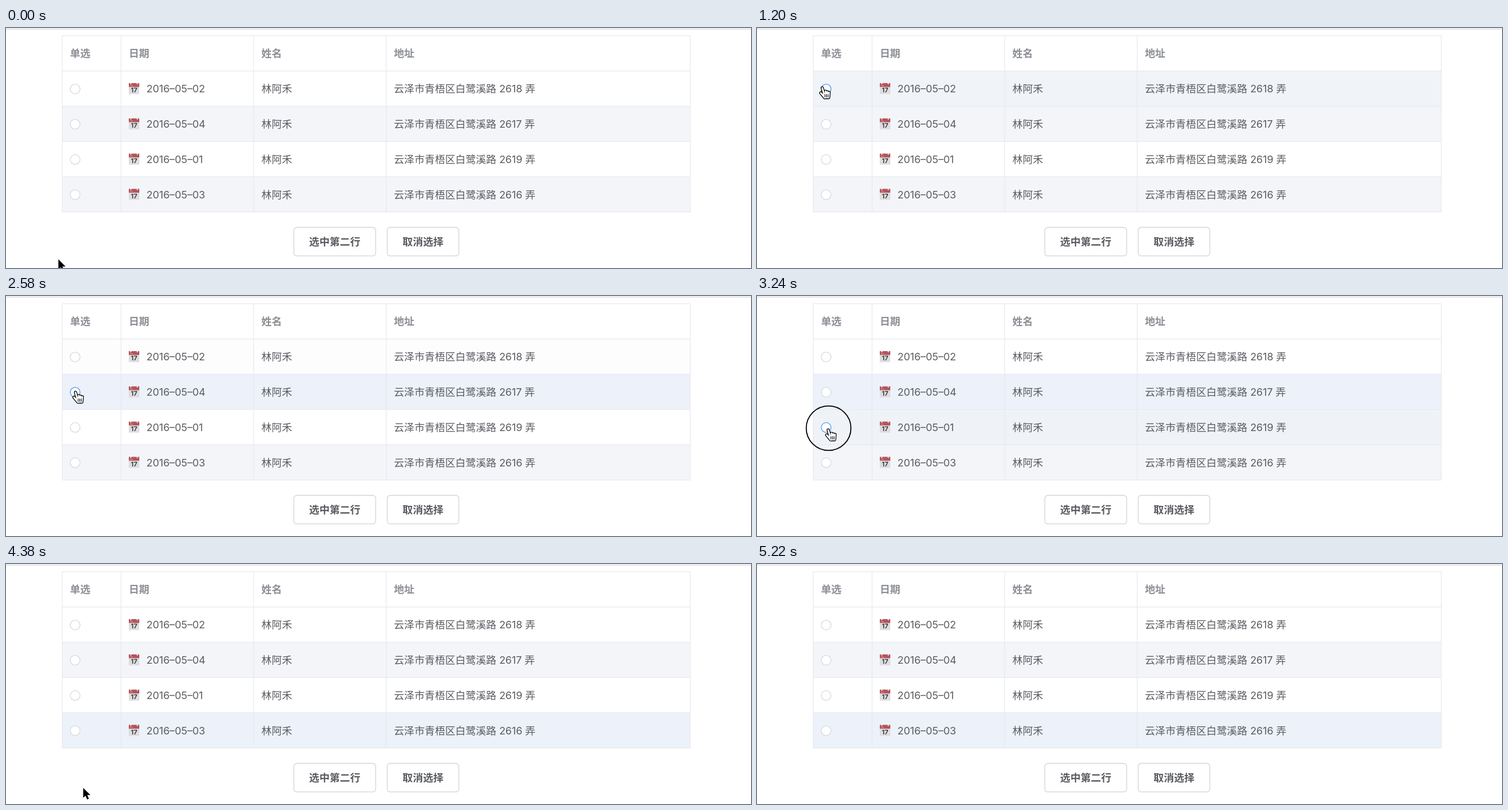
Recreate the animation shown at these times as an HTML page with a canvas. Size 1280 by 414 pixels, loop 5280 ms.

```html
<!DOCTYPE html>
<html lang="zh-CN">
<head>
<meta charset="utf-8">
<title>单选表格</title>
<style>
html, body { margin: 0; width: 100%; height: 100%; overflow: hidden; background: #fff; }
canvas { display: block; }
</style>
</head>
<body>
<canvas id="stage" width="1280" height="414"></canvas>
<script>
const ctx = document.getElementById('stage').getContext('2d');
const LOOP = 5280, STEP = 60;
const TOP = 13.4, ROW_H = 60.8, LEFT = 96.6, RIGHT = 1175.6;
const COLS = [LEFT, 197.7, 425.5, 653.2];
const PAD = 13.3, BASELINE = ROW_H / 2 + 6.5;
const FONT = '17.6px Inter, "Noto Sans CJK SC", "Noto Sans CJK", sans-serif';

const HEAD = ['单选', '日期', '姓名', '地址'];
const PERSON = '林阿禾', STREET = '云泽市青梧区白鹭溪路';
const ROWS = [[2, 8], [4, 7], [1, 9], [3, 6]].map(([day, no]) =>
  ({ date: `2016–05–0${day}`, address: `${STREET} 261${no} 弄` }));

const WHITE = [255, 255, 255], STRIPE = [243, 245, 249];
const HOVER = [239, 242, 247], PICKED = [236, 241, 250];
const LINE = '#e7e9ee', INK = '#595b60';

// Pointer moves: start, end, target
const MOVES = [
  { from: 300, to: 420, x: 174, y: 346 },
  { from: 540, to: 1080, x: 112, y: 100 },
  { from: 1140, to: 1380, x: 117, y: 101 },
  { from: 1740, to: 2040, x: 120, y: 163 },
  { from: 2580, to: 3120, x: 123, y: 228 },
  { from: 3360, to: 3720, x: 119, y: 287 },
  { from: 4200, to: 4500, x: 140, y: 440 }
];
// The nth press picks the nth row on release
const PRESSES = [1560, 2220, 3180, 3840], HOLD = 180;

function ease(t, from, to) {
  const u = Math.min(1, Math.max(0, (t - from) / (to - from)));
  return u * u * (3 - 2 * u);
}

function pointer(t) {
  const p = { x: 90, y: 399 };
  for (const m of MOVES) {
    const k = ease(t, m.from, m.to);
    p.x += (m.x - p.x) * k;
    p.y += (m.y - p.y) * k;
  }
  return p;
}

const scroll = t => 1.3 * (ease(t, 5040, 5220) - ease(t, 4380, 4560));
const pressed = t => PRESSES.some(s => t >= s && t < s + HOLD);
const pickedRow = t => PRESSES.filter(s => t >= s + HOLD).length - 1;
const rowTop = i => TOP + ROW_H * (i + 1);
const radioPos = i => ({ x: 118.8, y: rowTop(i) + ROW_H / 2 + 0.6 });
const base = i => i % 2 ? STRIPE : WHITE;

function overRadio(p, i) {
  const r = radioPos(i);
  return Math.abs(p.x - r.x) < 10 && Math.abs(p.y - r.y) < 10;
}

// Row colours ease towards their current state, one step at a time
function rowFills(time) {
  let fills = ROWS.map((_, i) => base(i));
  for (let t = 0; t <= time; t += STEP) {
    const p = pointer(t);
    const over = Math.floor((p.y - rowTop(0)) / ROW_H);
    fills = fills.map((c, i) => {
      const goal = i === pickedRow(t) ? PICKED : i === over ? HOVER : base(i);
      return c.map((v, k) => v + (goal[k] - v) * 0.42);
    });
  }
  return fills.map(c => `rgb(${c.map(Math.round)})`);
}

function text(s, x, y, color, weight = 400, align = 'left') {
  ctx.font = `${weight} ${FONT}`;
  ctx.fillStyle = color;
  ctx.textAlign = align;
  ctx.fillText(s, x, y);
}

function rect(x, y, w, h, color) {
  ctx.fillStyle = color;
  ctx.fillRect(x, y, w, h);
}

function ring(x, y, r, color, width, fill = 'transparent') {
  ctx.beginPath();
  ctx.arc(x, y, r, 0, Math.PI * 2);
  ctx.fillStyle = fill;
  ctx.fill();
  ctx.strokeStyle = color;
  ctx.lineWidth = width;
  ctx.stroke();
}

function calendar(x, y) {
  rect(x, y, 18, 19, '#dedde0');
  rect(x, y, 18, 6.6, '#b4545a');
  for (const dx of [2.4, 13.6]) rect(x + dx, y - 0.4, 2, 2.4, '#f4e4e4');
  rect(x + 2, y + 4, 5, 1, '#d79a9d');
  ctx.font = '600 11px Inter, sans-serif';
  ctx.fillStyle = '#2c2c2e';
  ctx.textAlign = 'center';
  ctx.fillText('17', x + 9, y + 16.3);
}

function button(x, w, label) {
  ctx.beginPath();
  ctx.roundRect(x, 344, w, 49.2, 5);
  ctx.strokeStyle = '#d3d5da';
  ctx.lineWidth = 1.3;
  ctx.stroke();
  text(label, x + w / 2, 374.6, INK, 600, 'center');
}

function table(t, p) {
  const width = RIGHT - LEFT;
  rowFills(t).forEach((color, i) => rect(LEFT, rowTop(i), width, ROW_H, color));
  for (let i = 0; i <= 5; i++) rect(LEFT - 0.6, TOP + ROW_H * i - 0.6, width + 1.2, 1.2, LINE);
  for (const x of [...COLS, RIGHT]) rect(x - 0.6, TOP, 1.2, ROW_H * 5, LINE);

  HEAD.forEach((s, i) => text(s, COLS[i] + PAD, TOP + BASELINE, '#8c8f95', 600));
  ROWS.forEach((row, i) => {
    const y = rowTop(i) + BASELINE, r = radioPos(i);
    ring(r.x, r.y, 8.4, overRadio(p, i) ? '#4a9af0' : '#d6d9de', 1.3, '#fff');
    calendar(211, y - 16);
    text(row.date, 241.2, y, INK);
    text(PERSON, COLS[2] + PAD, y, INK);
    text(row.address, COLS[3] + PAD, y, INK);
  });
}

function stroke(path, color, width) {
  ctx.strokeStyle = color;
  ctx.lineWidth = width;
  ctx.stroke(path);
}

function arrow() {
  const shape = new Path2D('M0 0V17.2L4 13.6L6.8 20L9.8 18.7L7 12.4H12.4Z');
  stroke(shape, '#fff', 2.6);
  ctx.fillStyle = '#000';
  ctx.fill(shape);
}

// Fingers are thick round strokes: black underneath, white on top
function hand() {
  const fingers = new Path2D('M5.4 2.8L10 19.6M2.8 11.4L9.6 19.6M6 14.5L10 17');
  const creases = new Path2D();
  for (let k = 0; k < 3; k++) {
    fingers.moveTo(11 + k * 3, 8.6 + k);
    fingers.lineTo(11 + k * 3 - k * 0.4, 19.6);
    creases.moveTo(10 + k * 2.7, 14);
    creases.lineTo(10 + k * 2.7, 18.6);
  }
  stroke(fingers, '#000', 5.4);
  stroke(fingers, '#fff', 2.9);
  stroke(creases, '#000', 1.1);
}

function cursor(p) {
  const pointing = ROWS.some((_, i) => overRadio(p, i));
  ctx.save();
  ctx.lineJoin = ctx.lineCap = 'round';
  if (pointing) {
    ctx.translate(p.x - 6, p.y + 0.4);
    hand();
  } else {
    ctx.translate(p.x, p.y);
    arrow();
  }
  ctx.restore();
}

function draw(now) {
  const t = Math.floor(now % LOOP / STEP) * STEP;
  const p = pointer(t);
  rect(0, 0, 1280, 414, '#fff');
  rect(0, 1, 1280, 1.4, '#d9d9da');
  ctx.save();
  ctx.translate(0, scroll(t));
  table(t, p);
  button(494.5, 140.6, '选中第二行');
  button(655, 123, '取消选择');
  ctx.restore();
  if (pressed(t)) ring(p.x, p.y, 38.4, '#000', 1.8);
  cursor(p);
}

let start;
function tick(now) {
  start ??= now;
  draw(now - start);
  requestAnimationFrame(tick);
}
requestAnimationFrame(tick);
</script>
</body>
</html>
```
